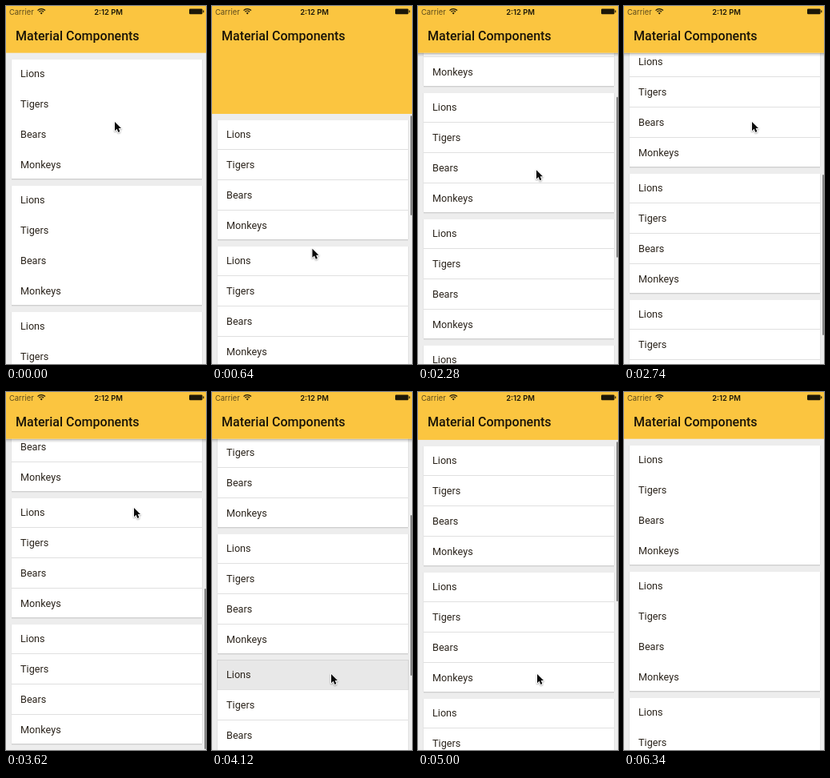
Animation of 250x448 px, one loop 8020 ms. Source, as an HTML page with a canvas:

```html
<!DOCTYPE html>
<html lang="en">
<head>
<meta charset="utf-8">
<title>List scrolling</title>
<style>
html, body { margin: 0; width: 100%; height: 100%; overflow: hidden; background: #ededed; }
canvas { display: block; width: 250px; height: 448px; }
</style>
</head>
<body>
<canvas id="stage" width="250" height="448"></canvas>
<script>
const ctx = document.getElementById('stage').getContext('2d');
const LOOP = 8020, W = 250, H = 448;
const HEADER = 58.67, CARD_TOP = 67, CARD_H = 149, CARD_STEP = 158, ROW_STEP = 38, CARDS = 5;
const MAX_SCROLL = 408.33;
const ROWS = ['Lions', 'Tigers', 'Bears', 'Monkeys'];
const AMBER = '#fbc540', INK = '#2b241c';

const clamp = (v, a = 0, b = 1) => Math.min(b, Math.max(a, v));
const lerp = (a, b, p) => a + (b - a) * p;
const part = (t, a, b) => clamp((t - a) / (b - a));
const smooth = p => p * p * (3 - 2 * p);
const flick = p => Math.pow(p, 1.5);

// Pulling past the top edge meets growing resistance.
const rubber = d => H * (1 - 1 / (d * 0.58 / H + 1));

const SPRING = 0.012, GLIDE = 500;
const settle = dt => (1 + SPRING * dt) * Math.exp(-SPRING * dt);

// Momentum from a release, with a spring once the edge is hit.
function fling(from, reach, edge, dt) {
  const left = 1 - (edge - from) / reach;
  const hit = -GLIDE * Math.log(left);
  if (dt < hit) return from + reach * (1 - Math.exp(-dt / GLIDE));
  const over = dt - hit;
  return edge + reach * left / GLIDE * over * Math.exp(-SPRING * over);
}

function scrollAt(t) {
  if (t < 1000) return -rubber(180 * smooth(part(t, 60, 800)));
  if (t < 1900) return -rubber(180) * settle(t - 1000);
  if (t < 2400) return 175 * flick(part(t, 1900, 2400));
  if (t < 3640) return fling(175, 316.2, MAX_SCROLL, t - 2400);
  if (t < 4120) return lerp(MAX_SCROLL, 206, flick(part(t, 3640, 4120)));
  if (t < 5520) return fling(206, -310, 0, t - 4120);
  return 0;
}

function pointerAt(t) {
  const path = [
    [60, 800, 136, 145, 124, 325, smooth],
    [1900, 2400, 124, 325, 160, 145, flick],
    [3640, 4120, 160, 145, 149, 353, flick],
    [5940, 6340, 149, 353, 228, 67, smooth]
  ];
  const leg = path.filter(l => t >= l[0]).pop() || path[0];
  const [a, b, x0, y0, x1, y1, ease] = leg;
  const p = ease(part(t, a, b));
  return [lerp(x0, x1, p), lerp(y0, y1, p)];
}

function rect(x, y, w, h, fill) {
  ctx.fillStyle = fill;
  ctx.fillRect(x, y, w, h);
}

function text(str, x, y, font, fill = INK, align = 'left') {
  ctx.font = font;
  ctx.fillStyle = fill;
  ctx.textAlign = align;
  ctx.fillText(str, x, y);
}

function card(y, lines, press) {
  rect(6, y, 240, CARD_H, '#e4e4e4');
  rect(7, y + CARD_H, 238, 1, '#cfcfcf');
  rect(7, y + CARD_H + 1, 238, 1, '#e2e2e2');
  rect(7, y, 238, CARD_H, '#fff');
  if (press > 0) {
    ctx.globalAlpha = press;
    rect(6, y - 1, 240, 38, '#d6d6d6');
    rect(7, y, 238, 37, '#e8e8e8');
    ctx.globalAlpha = 1;
  }
  ROWS.forEach((name, i) => {
    const top = y + i * ROW_STEP;
    text(name, 18, top + 22, '12.67px Roboto, sans-serif');
    if (lines && i < 3) rect(7, top + 36, 238, 1, '#e0e0e0');
  });
}

function statusBar() {
  text('Carrier', 4, 10.5, '9.4px Inter, sans-serif', '#5c4a1c');
  text('2:12 PM', 128, 10.5, '600 9.4px Inter, sans-serif', '#1c1708', 'center');
  ctx.strokeStyle = ctx.fillStyle = '#1c1708';
  ctx.lineWidth = 1.4;
  for (const r of [3.9, 6.4]) {
    ctx.beginPath();
    ctx.arc(44.2, 10, r, -Math.PI * 0.76, -Math.PI * 0.24);
    ctx.stroke();
  }
  ctx.beginPath();
  ctx.moveTo(44.2, 10.4);
  ctx.arc(44.2, 10, 2, -Math.PI * 0.76, -Math.PI * 0.24);
  ctx.fill();
  ctx.beginPath();
  ctx.roundRect(229, 3.4, 16.5, 6.8, 1.2);
  ctx.fill();
  rect(246.2, 5.4, 1.2, 2.8, '#1c1708');
}

function header(s) {
  const bottom = HEADER - Math.min(s, 0);
  if (s > 0.2) {
    const g = ctx.createLinearGradient(0, bottom, 0, bottom + 5);
    g.addColorStop(0, 'rgba(0,0,0,.32)');
    g.addColorStop(0.4, 'rgba(0,0,0,.12)');
    g.addColorStop(1, 'rgba(0,0,0,0)');
    ctx.globalAlpha = clamp(s / 8);
    rect(0, bottom, W, 5, g);
    ctx.globalAlpha = 1;
  }
  rect(0, 0, W, bottom, AMBER);
  statusBar();
  text('Material Components', 12, 42.5, '500 16px Roboto, sans-serif', '#1a1408');
}

function scrollBar(s, t) {
  const alpha = t < 1850
    ? part(t, 60, 120) * (1 - part(t, 1600, 1800))
    : part(t, 1900, 1960) * (1 - part(t, 5200, 5380));
  if (alpha <= 0) return;
  const inside = clamp(s, 0, MAX_SCROLL);
  const over = Math.abs(s - inside);
  const top = 61 + 185 * inside / MAX_SCROLL + over;
  ctx.globalAlpha = alpha;
  ctx.fillStyle = '#858585';
  ctx.beginPath();
  ctx.roundRect(248, top, 2, 201 - over, 1);
  ctx.fill();
  ctx.globalAlpha = 1;
}

function pointer(x, y) {
  const shape = [[0, 0], [0, 11.2], [2.6, 8.8], [4.4, 13], [6.4, 12.1], [4.7, 8.1], [8, 8.1]];
  ctx.save();
  ctx.translate(x, y);
  ctx.beginPath();
  shape.forEach(p => ctx.lineTo(...p));
  ctx.closePath();
  ctx.lineJoin = 'round';
  ctx.strokeStyle = '#fff';
  ctx.lineWidth = 1.8;
  ctx.shadowColor = 'rgba(0,0,0,.35)';
  ctx.shadowBlur = 2;
  ctx.shadowOffsetY = 1;
  ctx.stroke();
  ctx.shadowColor = 'transparent';
  ctx.fillStyle = '#0a0a0a';
  ctx.fill();
  ctx.restore();
}

function draw(t) {
  const s = scrollAt(t);
  // Hairlines vanish when they land between whole pixels.
  const lines = Math.round(s * 3) % 3 !== 0;
  const press = part(t, 3640, 3740) * (1 - part(t, 4130, 4330));
  rect(0, 0, W, H, '#ededed');
  for (let i = 0; i < CARDS; i++) {
    const y = CARD_TOP + i * CARD_STEP - Math.round(s);
    if (y < H && y + CARD_H > 0) card(y, lines, i === 3 ? press : 0);
  }
  header(s);
  scrollBar(s, t);
  if (t < 6340) pointer(...pointerAt(t));
}

const start = performance.now();
function tick() {
  draw((performance.now() - start) % LOOP);
  requestAnimationFrame(tick);
}
tick();
</script>
</body>
</html>
```
